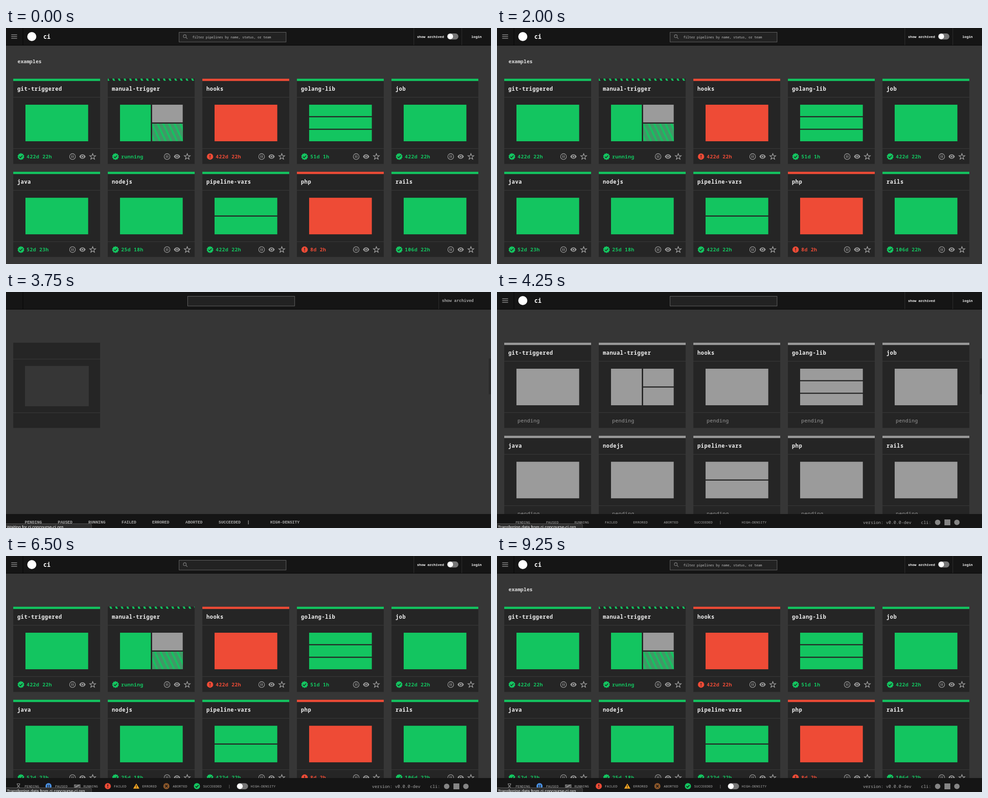
An HTML page that plays this animation: 1072x523 px, repeating every 9.5 s.

```html
<!DOCTYPE html>
<html lang="en">
<head>
<meta charset="utf-8">
<title>Pipelines dashboard</title>
<style>
html, body { margin: 0; width: 100%; height: 100%; overflow: hidden; background: #363636; }
svg { display: block; }
text { font-family: "Noto Sans Mono", "DejaVu Sans Mono", monospace; white-space: pre; }
.title { font-size: 11.6px; font-weight: 600; letter-spacing: .65px; fill: #f2f2f2; }
.age { font-size: 11px; font-weight: 600; letter-spacing: .4px; }
.idle { font-weight: 500; fill: #9b9b9b; }
.group { font-size: 11px; font-weight: 700; letter-spacing: .05px; fill: #dedede; }
.name { font-size: 13.3px; font-weight: 700; fill: #fff; }
.nav { font-size: 7.63px; font-weight: 600; fill: #f2f2f2; }
.hint { font-size: 7.07px; fill: #c4c4c4; }
.key { font-size: 7.63px; font-weight: 500; fill: #a8a8a8; }
.info { font-size: 9.4px; fill: #a8a8a8; }
.plain { font: bold 9px "Liberation Mono", "Courier New", monospace; fill: #a8a8a8; }
.status { font: 9.3px "Liberation Sans", Arial, sans-serif; fill: #fff; }

.data, .intro, .app, .skel, .pend, .bar, .ready, .keys, .before, .after, .scroll {
  animation: 9.5s step-end infinite;
}
.app { animation-name: app; }
.data { animation-name: data; }
.intro { animation-name: intro; }
.skel { animation-name: skel; }
.pend { animation-name: pend; }
.bar { animation-name: bar; }
.ready { animation-name: ready; }
.keys, .after { animation-name: late; }
.before { animation-name: before; }
.scroll { animation-name: scroll; }
@keyframes app { 0%, 42.105% { visibility: visible } 36.842% { visibility: hidden } }
@keyframes data { 0%, 55.263% { visibility: visible } 36.842% { visibility: hidden } }
@keyframes intro { 0%, 73.684% { visibility: visible } 36.842% { visibility: hidden } }
@keyframes skel { 0%, 42.105% { visibility: hidden } 36.842% { visibility: visible } }
@keyframes pend { 0%, 55.263% { visibility: hidden } 42.105% { visibility: visible } }
@keyframes bar { 0% { visibility: hidden } 36.842% { visibility: visible } }
@keyframes ready { 0% { visibility: hidden } 42.105% { visibility: visible } }
@keyframes late { 0% { visibility: hidden } 55.263% { visibility: visible } }
@keyframes before { 0% { visibility: visible } 36.842% { visibility: hidden } }
@keyframes scroll { 0%, 47.368% { visibility: hidden } 36.842% { visibility: visible } }

.march { animation: march .5s step-end infinite; }
.after .march { animation-delay: -.25s; }
@keyframes march {
  0% { transform: translateX(-2.7px) }
  50% { transform: translateX(3.53px) }
}
</style>
</head>
<body>
<svg id="stage" width="1072" height="523" viewBox="0 0 1072 523"></svg>
<script>
const GREEN = '#13c560', RED = '#ee4b36', GRAY = '#9b9b9b', CARD = '#252525', BACK = '#363636', DARK = '#151515';

const rect = (x, y, w, h, fill, more = '') =>
  `<rect x="${x}" y="${y}" width="${w}" height="${h}" fill="${fill}" ${more}/>`;
const dot = (x, y, r, fill) => `<circle cx="${x}" cy="${y}" r="${r}" fill="${fill}"/>`;
const line = (d, color, w = 1.3) => `<path d="${d}" fill="none" stroke="${color}" stroke-width="${w}"/>`;
const text = (x, y, cls, s, fill) =>
  `<text x="${x}" y="${y}" class="${cls}"${fill ? ` fill="${fill}"` : ''}>${s}</text>`;
const at = (x, y, body) => `<g transform="translate(${x} ${y})">${body}</g>`;
const group = (cls, ...parts) => `<g class="${cls}">${parts.join('')}</g>`;

// closed outline from a radius function
const ring = (n, radius) => Array.from({ length: n }, (_, i) => {
  const a = i / n * 2 * Math.PI - Math.PI / 2, r = radius(i);
  return `${(r * Math.cos(a)).toFixed(2)},${(r * Math.sin(a)).toFixed(2)}`;
}).join(' ');

const check = color => line('M-3.4 .2L-1 2.6L3.5 -2.1', color, 1.6);
const bang = color => rect(-.8, -3.9, 1.6, 4.6, color) + rect(-.8, 2, 1.6, 1.7, color);
const icon = {
  ok: `<polygon points="${ring(80, i => 7 + .55 * Math.cos(i / 8 * 2 * Math.PI))}" fill="${GREEN}"/>` + check(CARD),
  bad: dot(0, 0, 7, RED) + bang(CARD),
  pause: `<circle r="6.4" fill="none" stroke="${GRAY}" stroke-width="1.3"/>` + line('M-1.6 -2.9V2.9M1.6 -2.9V2.9', GRAY),
  eye: `<path fill-rule="evenodd" fill="${GRAY}" d="M-7 0C-5.4 -3.2 -2.8 -4.8 0 -4.8S5.4 -3.2 7 0C5.4 3.2 2.8 4.8 0 4.8S-5.4 3.2 -7 0Z` +
    `M-3.2 0a3.2 3.2 0 1 0 6.4 0a3.2 3.2 0 1 0 -6.4 0Z"/>` + dot(0, 0, 1.9, GRAY),
  star: `<polygon points="${ring(10, i => i % 2 ? 2.9 : 7)}" fill="none" stroke="#acacac" stroke-width="1.2"/>`,
  glass: line('M-3.6 -5.2H3.6M-3.6 5.2H3.6M-2.6 -5V-2.8L2.6 2.8V5M2.6 -5V-2.8L-2.6 2.8V5', GRAY, 1.1),
  paused: dot(0, 0, 6.8, '#4a90e2') + line('M-1.7 -3V3M1.7 -3V3', DARK, 1.4),
  running: rect(-7, -3.5, 14, 7, '#8d8d8d') + '<path d="M-7 0L-1 -3.5H3L-7 2.5ZM-3 3.5L7 -2.5V.6L2 3.5Z" fill="#4c4c4c"/>',
  failed: dot(0, 0, 6.8, RED) + bang(DARK),
  errored: '<path d="M0 -5.8L6.8 5.4H-6.8Z" fill="#f5a623"/>' + rect(-.7, -2, 1.4, 3.6, DARK) + rect(-.7, 2.6, 1.4, 1.4, DARK),
  aborted: dot(0, 0, 6.8, '#8b572a') + line('M-2.7 -2.7L2.7 2.7M2.7 -2.7L-2.7 2.7', DARK, 1.4),
  done: dot(0, 0, 6.8, GREEN) + check(DARK)
};
const toggle = (x, y) => rect(x, y, 25, 13.4, '#777', 'rx="6.7"') + dot(x + 7, y + 6.7, 6.2, '#fff');

// name, age, failed, rows in the preview
const pipes = [
  ['git-triggered', '422d 22h'], ['manual-trigger', 'running', 0, 0], ['hooks', '422d 22h', 1],
  ['golang-lib', '51d 1h', 0, 3], ['job', '422d 22h'],
  ['java', '52d 23h'], ['nodejs', '25d 18h'], ['pipeline-vars', '422d 22h', 0, 2],
  ['php', '8d 2h', 1], ['rails', '106d 22h']
];

const stripes = (x, y, w, h, fill) =>
  `<svg x="${x}" y="${y}" width="${w}" height="${h}">${rect(-20, 0, w + 40, h, `url(#${fill})`, 'class="march"')}</svg>`;

const preview = (rows, color, last = color) => {
  const top = 57.6, h = 81, gap = 2.5;
  if (rows === 0) return rect(27, top, 68, h, color) + rect(98, top, 67.6, 39.2, GRAY) +
    (last === GRAY ? rect(98, top + 41.8, 67.6, 39.2, GRAY) : '');
  const each = (h - gap * (rows - 1)) / rows;
  return Array.from({ length: rows }, (_, i) => rect(27, top + i * (each + gap), 138.6, each, color)).join('');
};

const card = ([name, age, failed, rows = 1], i) => {
  const color = failed ? RED : GREEN, busy = rows === 0;
  const march = cls => group(cls, stripes(0, 0, 192, 5, 'banner'), stripes(98, 99.4, 67.6, 39.2, 'tile'));
  return at(16 + i % 5 * 209, i < 5 ? 112.4 : 318.6, group('app',
    rect(0, 0, 192, 188.8, CARD), rect(0, 40.4, 192, 1.4, BACK), rect(0, 154.2, 192, 1.4, BACK),
    text(9, 26.8, 'title', name)) +
    group('data',
      busy ? '' : rect(0, 0, 192, 5, color), preview(rows, color),
      at(17, 172.5, failed ? icon.bad : icon.ok), text(29.6, 176.4, 'age', age, color),
      at(131, 172.5, icon.pause), at(153, 172.5, icon.eye), at(175.6, 172.8, icon.star)) +
    (busy ? march('before') + march('after') : '') +
    group('pend', rect(0, 0, 192, 5, GRAY), preview(rows, GRAY, GRAY), text(29.6, 176.4, 'age idle', 'pending')));
};

const gradient = (id, thick, thin) =>
  `<linearGradient id="${id}" gradientUnits="userSpaceOnUse" x1="0" y1="0" x2="-10.236" y2="4.773" spreadMethod="repeat">
  <stop offset="0" stop-color="${thick}"/><stop offset=".625" stop-color="${thick}"/>
  <stop offset=".6875" stop-color="${thin}"/><stop offset="1" stop-color="${thin}"/></linearGradient>`;

// label, x, x with the fallback font, icon, icon x
const legend = [
  ['PENDING', 41, 41.5, 'glass', 27.5], ['PAUSED', 108.5, 114.5, 'paused', 94],
  ['RUNNING', 171, 182, 'running', 157.5], ['FAILED', 238.5, 255.5, 'failed', 225],
  ['ERRORED', 301, 323, 'errored', 288], ['ABORTED', 368.5, 396.5, 'aborted', 354.5],
  ['SUCCEEDED', 435.5, 470, 'done', 422], ['|', 491.5, 533], ['HIGH-DENSITY', 541, 584]
];

const search = x => rect(x + .5, 9.5, 236.5, 21.5, '#222', 'stroke="#666"');
const divider = x => rect(x, 0, 1, 38, '#303030');

const topBar = rect(0, 0, 1072, 38, DARK) + rect(0, 37.5, 1072, 1.5, '#0e0e0e') + rect(37, 0, 1, 38, '#050505') +
  group('app',
    line('M11.5 15H24.5M11.5 19H24.5M11.5 23H24.5', '#8c8c8c', 1.5), dot(57, 19, 10, '#fff'),
    text(82.5, 24, 'name', 'ci'), search(382), divider(901), divider(1007),
    text(908.5, 22, 'nav', 'show archived'), text(1028.5, 22, 'nav', 'login')) +
  group('data', line('M398.4 18.2a3.2 3.2 0 1 1 -6.4 0a3.2 3.2 0 1 1 6.4 0M397.5 20.5L401 24', '#777', 1.3), toggle(975, 12)) +
  group('intro', text(412, 22.6, 'hint', 'filter pipelines by name, status, or team'), text(25.5, 78, 'group', 'examples')) +
  group('skel', search(401), divider(956), text(963.5, 22, 'plain', 'show archived', '#f2f2f2'));

const skeleton = group('skel',
  rect(16, 112.4, 192, 188.8, CARD), rect(16, 148, 192, 1.4, BACK),
  rect(42, 163.8, 141, 89.4, BACK), rect(16, 266.8, 192, 1.4, BACK));

const statusBox = s => '<path d="M-1 513.5H186a3 3 0 0 1 3 3V525H-1Z" fill="#2d2d2d" stroke="#555"/>' +
  text(2, 523.6, 'status', s);

const bottomBar = group('bar', rect(0, 492, 1072, 31, DARK)) +
  group('skel', ...legend.map(k => text(k[2], 513.4, 'plain', k[0])), statusBox('Waiting for ci.concourse-ci.org…')) +
  group('keys', ...legend.filter(k => k[3]).map(k => at(k[4], 510, icon[k[3]])), toggle(510, 503.5)) +
  group('ready', ...legend.map(k => text(k[1], 513, 'key', k[0])),
    text(809, 513.6, 'info', 'version: v0.0.0-dev'), text(937, 513.6, 'info', 'cli:'),
    dot(974, 510.5, 6, '#858585'), rect(989, 504, 13, 13, '#858585'), dot(1016.5, 510.5, 6, '#858585'),
    statusBox('Transferring data from ci.concourse-ci.org…'));

document.getElementById('stage').innerHTML =
  `<defs>${gradient('banner', CARD, GREEN)}${gradient('tile', '#419867', GREEN)}</defs>` +
  rect(0, 0, 1072, 523, BACK) + skeleton + pipes.map(card).join('') + topBar + bottomBar +
  group('scroll', rect(1067, 147, 5, 80, '#2a2a2a', 'rx="2.5"'));
</script>
</body>
</html>
```
